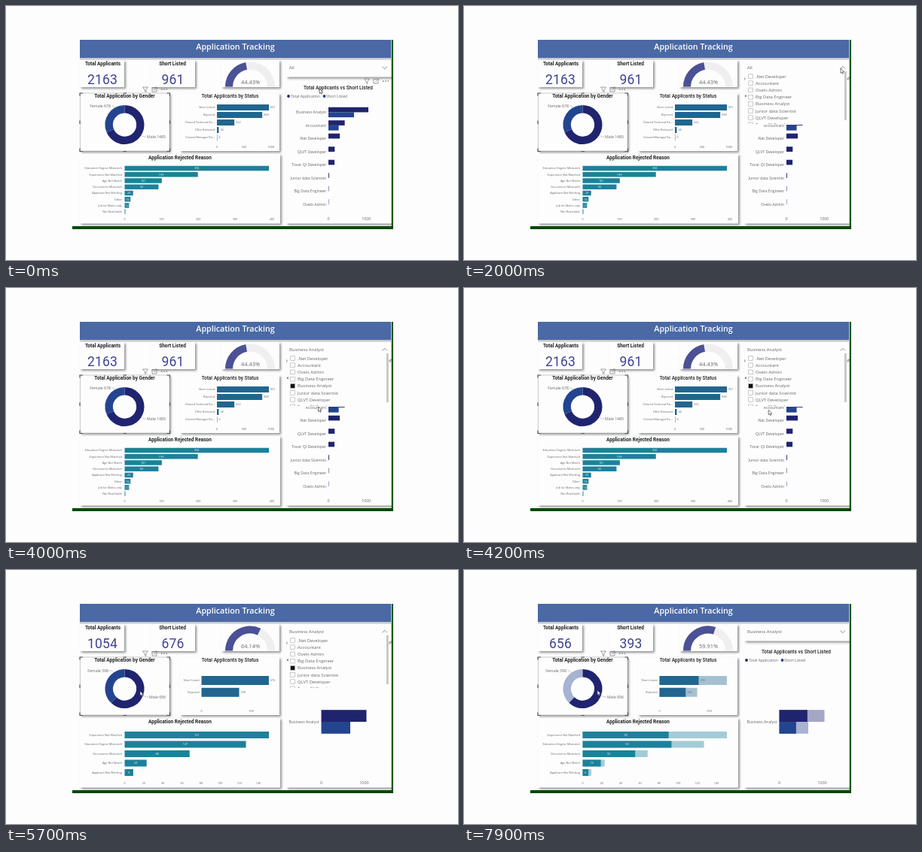
Recreate the animation shown at these times as an HTML page. Size 600x338 px, loop 8000 ms.

```html
<!DOCTYPE html>
<html lang="en">
<head>
<meta charset="utf-8">
<title>Application Tracking</title>
<style>
  html, body { margin: 0; width: 100%; height: 100%; overflow: hidden; background: #fdfdfd; }
  svg { display: block; width: 600px; height: 338px; }
  text { font-family: "Open Sans", "Noto Sans", sans-serif; fill: #666; }
  .din { font-family: Roboto, sans-serif; }
  .card { fill: #fdfdfd; filter: drop-shadow(2px 2px 1.5px rgba(0, 0, 0, .42)); }
  .icon { fill: none; stroke: #777; stroke-width: .7; }
</style>
</head>
<body>
<svg id="stage" viewBox="0 0 600 338"></svg>
<script>
const LOOP = 8000;
const NAVY = '#20246f', BLUE = '#23448f', STEEL = '#21668f', TEAL = '#1d819b', INDIGO = '#4b5195';

const rect = (x, y, w, h, fill, more = '') =>
  `<rect x="${x}" y="${y}" width="${w}" height="${h}" fill="${fill}" ${more}/>`;

// y is the middle of the capitals
const text = (x, y, str, size, anchor = 'start', more = '') =>
  `<text x="${x}" y="${y + size * .36}" font-size="${size}" text-anchor="${anchor}" ${more}>${str}</text>`;

const heading = (x, y, str, weight = 700) =>
  text(x, y, str, 6.5, 'middle', `class="din" font-weight="${weight}" style="fill:#222"`);

const card = (x, y, w, h) => `<rect class="card" x="${x}" y="${y}" width="${w}" height="${h}"/>`;

const group = (id, body, more = '') => `<g id="${id}" ${more}>${body}</g>`;

// Ring segment; from and to are turns clockwise from the top
function ring(cx, cy, r, width, from, to, color, opacity = 1) {
  const at = a => `${cx + r * Math.sin(a * 2 * Math.PI)} ${cy - r * Math.cos(a * 2 * Math.PI)}`;
  return `<path d="M${at(from)}A${r} ${r} 0 ${to - from > .5 ? 1 : 0} 1 ${at(to)}" fill="none"
    stroke="${color}" stroke-width="${width}" opacity="${opacity}"/>`;
}

// A bar, faded behind its highlighted part when there is one
function bar(x, y, h, value, scale, color, part) {
  const full = rect(x, y, Math.max(value * scale, .4), h, color, part == null ? '' : 'opacity=".4"');
  return part == null ? full : full + rect(x, y, part * scale, h, color);
}

function axis(y, x, scale, ticks, size) {
  return ticks.map(v => text(x + v * scale, y, v, size, 'middle')).join('');
}

function icons(x, y) {
  return `<g class="icon" transform="translate(${x} ${y})">
    <path d="M-3.5-3H3.5L.8 .5V3.5L-.8 2.5V.5Z"/>
    <path d="M13-2.5H9V3H15V0M11.5 1L15.5-3M13-3H15.5V-.5"/>
    <path d="M21 0H29" stroke-width="1.4" stroke-dasharray="1.4 2"/></g>`;
}

function summary(total, listed) {
  const big = (x, n) => text(x, 97.5, n, 17.5, 'middle', 'class="din" letter-spacing=".2" style="fill:#3d4393"');
  const share = listed / total;
  return big(128, total) + big(221.5, listed) +
    ring(324, 107.5, 28, 10, -.25, .25, '#efefef') +
    ring(324, 107.5, 28, 10, -.25, -.25 + share / 2, INDIGO) +
    text(324.5, 101, (share * 100).toFixed(2) + '%', 7.4, 'middle');
}

function gender(female, male, fade, marks) {
  const cut = male / (male + female);
  const [fx, fy, mx, my] = marks;
  return ring(157.5, 158, 20.8, 10.4, 0, cut, NAVY) +
    ring(157.5, 158, 20.8, 10.4, cut, 1, BLUE, fade) +
    `<path d="M${fx + 1} ${fy}H${fx + 4}L${fx + 7} ${fy + 3}M${mx - 1} ${my}H${mx - 4}L${mx - 8} ${my - 2}"
      fill="none" stroke="#aaa" stroke-width=".6"/>` +
    text(fx, fy, 'Female ' + female, 5.2, 'end') + text(mx, my, 'Male ' + male, 5.2);
}

// rows: [label, value, highlighted part]
function status(rows, { x, y, step, h, scale, ticks }) {
  return rows.map(([name, n, part], i) => {
    const cy = y + i * step;
    return text(x - 3, cy, name, 3.8, 'end') + bar(x, cy - h / 2, h, n, scale, STEEL, part) +
      text(x + (part ?? n) * scale + 2, cy, part ?? n, 3.8);
  }).join('') + axis(187.5, x, scale, ticks, 3.8);
}

function reasons(rows, { y, step, h, scale, ticks }) {
  const x = 157.5;
  return rows.map(([name, n, part], i) => {
    const cy = y + i * step, shown = part ?? n;
    return text(x - 3.5, cy, name, 3.8, 'end') + bar(x, cy - h / 2, h, n, scale, TEAL, part) +
      (shown > 2 ? text(x + shown * scale / 2, cy, shown, 3.8, 'middle', 'style="fill:#fff"') : '');
  }).join('') + axis(283.5, x, scale, ticks, 3.8);
}

// rows: [label, applicants, listed, highlighted applicants, highlighted listed]
function roles(rows, { x, y, step, h, scale }) {
  return rows.map(([name, a, b, partA, partB], i) => {
    const cy = y + i * step;
    return text(x - 3, cy, name, 5.15, 'end') + bar(x, cy - h, h, a, scale, NAVY, partA) +
      (b ? bar(x, cy, h, b, scale, BLUE, partB) : '');
  }).join('') + axis(283, x, scale, [0, 1000], 5.4);
}

const wide = { x: 259.5, y: 147, step: 15.8, h: 12, scale: .1323, ticks: [0, 500] };
const tall = { y: 219.5, step: 12.5, h: 9, scale: 1.268, ticks: [0, 20, 40, 60, 80, 100, 120, 140] };
const single = { x: 418.5, y: 202, step: 0, h: 15.8, scale: .0569 };

const views = {
  all: summary(2163, 961) + gender(678, 1485, 1, [139, 133, 187, 174]) +
    status([['Short Listed', 961], ['Rejected', 838], ['Cleared Technical Ro...', 322],
      ['Offer Released', 34], ['Cleared Manager Ro...', 6]],
      { x: 280, y: 135, step: 10, h: 8, scale: .0718, ticks: [0, 500, 1000] }) +
    reasons([['Education Degree Mismatch', 392], ['Experience Not Matched', 199], ['Age Not Match', 101],
      ['Documents Mismatch', 92], ['Applicant Not Working', 23], ['Other', 16],
      ['Job for Males only', 12], ['Not Reachable', 2]],
      { y: 216, step: 8.23, h: 6.5, scale: .4885, ticks: [0, 100, 200, 300, 400] }) +
    roles([['Business Analyst', 1054, 676], ['Accountant', 430, 270], ['.Net Developer', 300],
      ['QLVT Developer', 165], ['Tovar QI Developer', 160], ['Junior data Scientist', 18],
      ['Big Data Engineer', 10], ['Ovelo Admin', 6]],
      { x: 428, y: 141.4, step: 17.5, h: 6.7, scale: .0503 }),

  role: summary(1054, 676) + gender(398, 656, 1, [136, 134, 190, 169]) +
    status([['Short Listed', 676], ['Rejected', 378]], wide) +
    reasons([['Experience Not Matched', 151], ['Education Degree Mismatch', 127], ['Documents Mismatch', 68],
      ['Age Not Match', 23], ['Applicant Not Working', 9]], tall) +
    roles([['Business Analyst', 1054, 676]], single),

  male: summary(656, 393) + gender(398, 656, .4, [136, 134, 190, 169]) +
    status([['Short Listed', 676, 393], ['Rejected', 378, 263]], wide) +
    reasons([['Experience Not Matched', 151, 90], ['Education Degree Mismatch', 127, 93],
      ['Documents Mismatch', 68, 55], ['Age Not Match', 23, 19], ['Applicant Not Working', 9, 6]], tall) +
    roles([['Business Analyst', 1054, 676, 656, 393]], single)
};

const frame = rect(98, 69, 413, 2.5, '#c9c9c9') + rect(98, 45, 413, 24, '#4a69a5') +
  text(304.5, 54.5, 'Application Tracking', 10.7, 'middle', 'font-weight="600" style="fill:#fff"') +
  card(98, 72, 59, 36) + card(192, 72, 59, 36) + card(286, 72, 77, 36) +
  card(98, 116, 119, 77) + card(231, 116, 132, 77) + card(98, 197, 266, 92.5) +
  card(372, 99, 142, 190.5) + card(372, 72, 142, 22.5) +
  heading(128.5, 76.5, 'Total Applicants') + heading(221, 76.5, 'Short Listed') +
  heading(157.5, 119.5, 'Total Application by Gender') +
  heading(297.5, 119.5, 'Total Applicants by Status', 500) +
  heading(231, 202, 'Application Rejected Reason') +
  heading(441, 108.5, 'Total Applicants vs Short Listed', 500) +
  `<circle cx="375" cy="120" r="1.9" fill="${NAVY}"/><circle cx="422.5" cy="120" r="1.9" fill="${BLUE}"/>` +
  text(378, 120, 'Total Application', 5.05) + text(425, 120, 'Short Listed', 5.05) +
  rect(98.5, 116, 118.5, 77, 'none', 'stroke="#aaa" stroke-width=".6"') +
  `<path d="M98 119.5V116H102M213.5 116H217.5V119.5M217.5 189.5V193.5H213.5M102 193.5H98V189.5M98
    152.5V157M217.5 152.5V157M155.5 116H160M155.5 193.5H160" fill="none" stroke="#555" stroke-width="1.2"/>` +
  icons(185, 111);

const items = ['.Net Developer', 'Accountant', 'Ovelo Admin', 'Big Data Engineer', 'Business Analyst',
  'Junior data Scientist', 'QLVT Developer', 'Tovar QI Developer'];

const menu = rect(372, 87, 138, 71, '#fdfdfd') + rect(505, 87, 2.8, 65, '#c6c6c6') +
  rect(372, 95.5, 1.5, 3, '#aaa') + rect(508.5, 95.5, 2, 3, '#aaa') +
  `<path d="M374.5 118V121.5L372.8 119.8Z" fill="#333"/>` +
  group('list', items.map((name, i) => {
    const y = 93.6 + i * 9.18;
    return rect(377.7, y - 2.9, 5.8, 5.8, '#fdfdfd', `stroke="#aaa" stroke-width=".6" ${i === 4 ? 'id="box"' : ''}`) +
      text(387, y, name, 5.85, 'start', i === 4 ? 'id="pick"' : '');
  }).join(''), 'clip-path="url(#listClip)"');

document.getElementById('stage').innerHTML =
  `<defs><clipPath id="board"><rect x="96" y="45" width="416" height="248"/></clipPath>
   <clipPath id="listClip"><rect x="372" y="87" width="132" height="70"/></clipPath></defs>` +
  `<g clip-path="url(#board)">` + frame +
  Object.entries(views).map(([id, body]) => group(id, body)).join('') +
  group('hover', icons(479, 100)) + group('menu', menu) +
  text(376, 82.3, 'All', 5.9, 'start', 'id="choice"') +
  `<path id="chevron" fill="none" stroke="#777" stroke-width=".8"/></g>` +
  rect(511.7, 45, 2.3, 252, '#0d5a1a') + rect(88, 293, 426, 4, '#004a08') +
  group('cursor', `<path id="arrow" d="M0 0V6.4L1.5 5.1L2.5 7.3L3.6 6.8L2.6 4.7H4.6Z" fill="#fff" stroke="#222" stroke-width=".6"/>
    <path id="hand" d="M-.8 3.5V-.2Q0-1 .8-.2V2L4 2.8Q4.6 3 4.4 4L3.8 7H.4L-2 4.4Q-1.8 3.3-.8 3.5Z"
      fill="#fff" stroke="#222" stroke-width=".6"/>`);

const $ = id => document.getElementById(id);
const show = (id, on) => $(id).setAttribute('display', on ? 'inline' : 'none');

// [time, x, y] of the pointer tip
const path = [
  [0, 416, 110], [150, 416, 110], [1000, 468, 90], [1150, 469.3, 90], [1800, 500, 83], [2050, 500, 83],
  [2750, 420, 132], [3600, 420, 132], [4000, 414.5, 158], [4600, 375, 174.5], [5600, 178, 161],
  [6300, 177.5, 160.5], [8000, 177, 160]
];

function pointer(t) {
  const i = path.findIndex(p => p[0] > t);
  const [t0, x0, y0] = path[i - 1], [t1, x1, y1] = path[i];
  const u = (t - t0) / (t1 - t0), k = u * u * (3 - 2 * u);
  return [x0 + (x1 - x0) * k, y0 + (y1 - y0) * k];
}

function draw(t) {
  const open = t >= 2000 && t < 6200, picked = t >= 3600;
  const view = t < 4300 ? 'all' : t < 6500 ? 'role' : 'male';
  for (const id in views) show(id, id === view);
  show('menu', open);
  show('hover', t < 700);
  $('choice').textContent = picked ? 'Business Analyst' : 'All';
  $('chevron').setAttribute('d', open ? 'M499.5 83.5L502.8 80.3L506 83.5' : 'M499.5 80.5L502.8 83.7L506 80.5');
  $('box').setAttribute('fill', picked ? '#111' : '#fdfdfd');
  $('pick').style.fill = t > 2650 && !picked ? '#aaa' : '';
  const [x, y] = pointer(t), hand = t > 2300 && t < 3800;
  show('hand', hand);
  show('arrow', !hand);
  $('cursor').setAttribute('transform', `translate(${x.toFixed(2)} ${y.toFixed(2)})`);
}

const start = performance.now();
function tick() {
  draw((performance.now() - start) % LOOP);
  requestAnimationFrame(tick);
}
tick();
</script>
</body>
</html>
```
